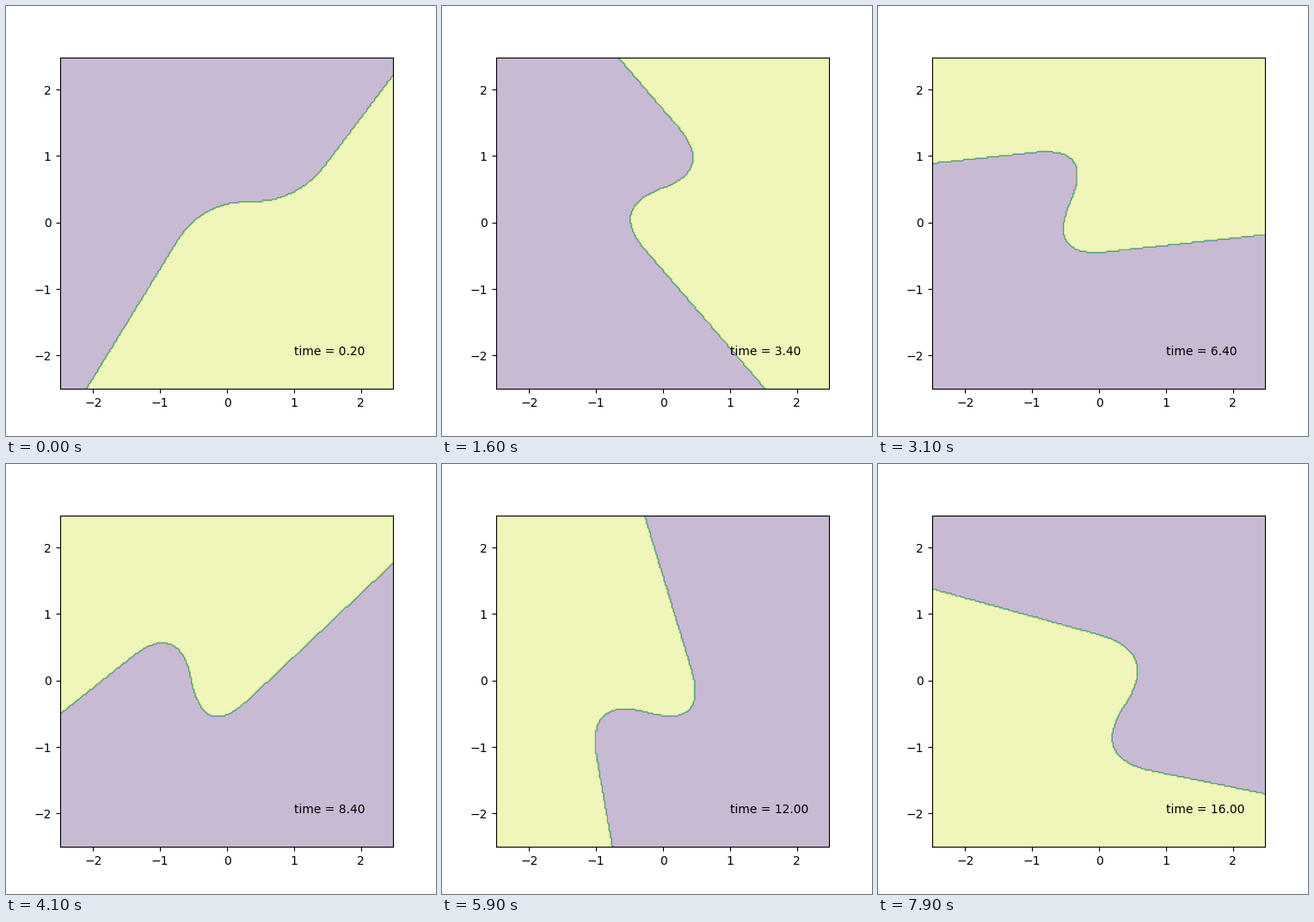
Recreate the animation shown at these times as a matplotlib script. Size 500 by 500 pixels, loop 8000 ms.

```python
import numpy as np
import matplotlib.pyplot as plt
from matplotlib.animation import FuncAnimation
from matplotlib.path import Path

LO, HI, STEP = -2.5, 2.48, 0.02
TURN = np.radians(18)  # rotation per unit of time
FRAMES, DT = 80, 0.2

# Slant of the two straight limbs of the boundary, in degrees.
TIMES = np.array([0.2, 2.0, 4.8, 6.4, 10.4, 13.6, 16.0])
LEFT = np.array([55, 69, 67.5, 71, 71.5, 68, 56.5])
RIGHT = np.array([49.6, 62, 73, 71, 64.5, 63.4, 60.5])

axis = np.arange(LO, LO + 5 - STEP / 2, STEP)
gx, gy = np.meshgrid(axis, axis)
grid = np.column_stack([gx.ravel(), gy.ravel()])
far_arc = 9 * np.exp(1j * np.radians([70, 100, 140, 180, 220]))


def unit(degrees):
    return np.exp(1j * np.radians(degrees))


def spline(x, xs, ys):
    """Cubic Hermite curve through (xs, ys), evaluated at x."""
    slope = np.gradient(ys, xs)
    i = np.clip(np.searchsorted(xs, x) - 1, 0, len(xs) - 2)
    h = xs[i + 1] - xs[i]
    u = (x - xs[i]) / h
    return ((1 + 2 * u) * (1 - u) ** 2 * ys[i]
            + u * (1 - u) ** 2 * h * slope[i]
            + u * u * (3 - 2 * u) * ys[i + 1]
            + u * u * (u - 1) * h * slope[i + 1])


def bend(a, corner, b):
    """Quadratic curve from a to b, rounding the corner."""
    u = np.linspace(0, 1, 40)
    return (1 - u) ** 2 * a + 2 * u * (1 - u) * corner + u * u * b


def boundary(t):
    """A Z with rounded corners that deepens at first, turned with time."""
    fade = np.exp(-t / 2.5)
    peak = complex(-0.13 - 0.25 * fade, 1 - 0.72 * fade)
    dip = complex(1.07, -0.5 + 0.8 * fade)
    left = -unit(spline(t, TIMES, LEFT))
    right = unit(spline(t, TIMES, RIGHT))
    mid = (peak + dip) / 2
    r = abs(dip - peak) / 2
    z = np.concatenate([[peak + 7 * left],
                        bend(peak + r * left, peak, mid),
                        bend(mid, dip, dip + r * right),
                        [dip + 7 * right], far_arc])
    return z * np.exp(1j * TURN * t)


def classes(t):
    z = boundary(t)
    inside = Path(np.column_stack([z.real, z.imag])).contains_points(grid)
    return 1.0 - inside.reshape(gx.shape)


fig, ax = plt.subplots(figsize=(5, 5), dpi=100)
label = ax.text(1, -2, "")


def draw(i):
    t = (i + 1) * DT
    for old in list(ax.collections):
        old.remove()
    ax.contourf(gx, gy, classes(t), cmap="viridis", alpha=0.3)
    ax.set(xlim=(LO, HI), ylim=(LO, HI))
    label.set_text(f"time = {t:.2f}")
    return [label]


anim = FuncAnimation(fig, draw, frames=FRAMES, interval=100, repeat=True,
                     repeat_delay=0)
plt.show()
```
